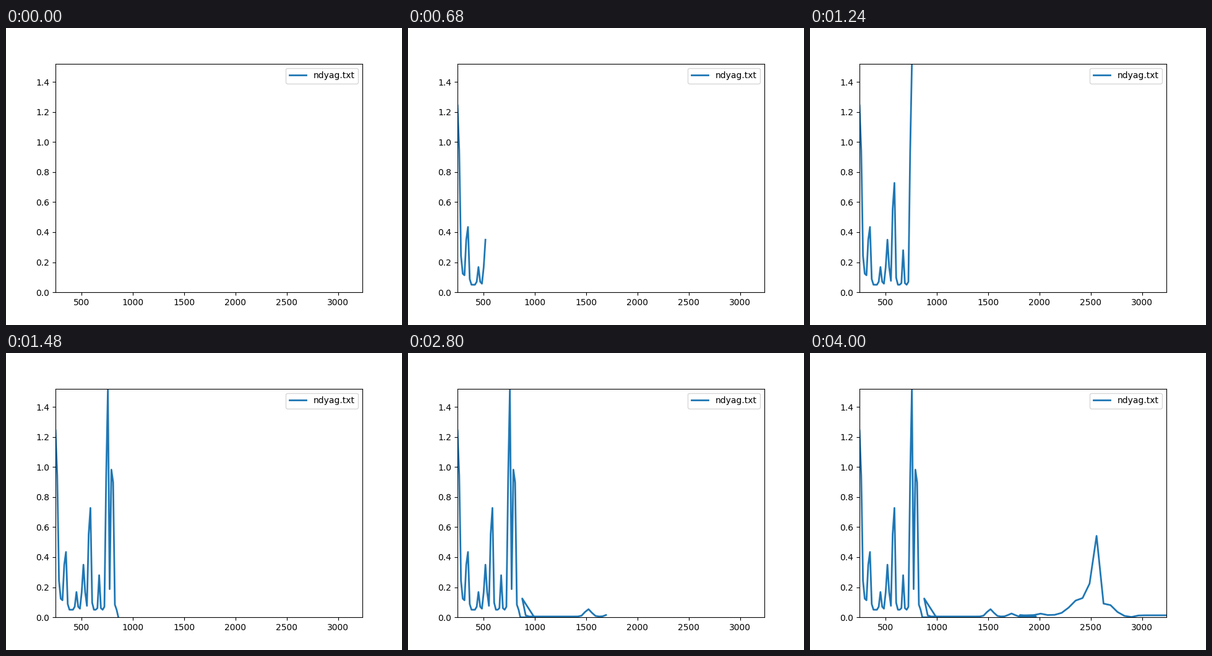
A matplotlib script for the animation above (5.6 s loop, 640 by 480 pixels).

```python
import numpy as np
import matplotlib.pyplot as plt
from matplotlib.animation import FuncAnimation

FRAMES, INTERVAL = 140, 40


def spectrum(count, base, peaks):
    """Sum of Gaussian peaks (centre, height, width), in sample numbers."""
    i = np.arange(count)
    return base + sum(h * np.exp(-((i - c) / w) ** 2) for c, h, w in peaks)


# Three overlapping sweeps, each sampled twice (then four times) as coarsely.
fine = spectrum(45, 0.05, [
    (0.27, 1.25, 1.26), (3.4, 0.08, 0.8), (5.6, 0.473, 0.88),
    (12, 0.118, 0.75), (16, 0.3, 1.03), (19.6, 0.86, 0.82),
    (25, 0.23, 0.57), (29.657, 1.786, 0.78), (32.47, 1.317, 0.8)])
fine[36:] = -0.0005  # detector cut-off
medium = spectrum(33, 0.005, [
    (0, 0.12, 0.6), (18.9, 0.049, 1.3), (25, 0.02, 1.2)])
coarse = spectrum(22, 0.013, [
    (3, 0.011, 0.7), (8.8, 0.115, 2), (10.88, 0.507, 0.756),
    (13.1, 0.067, 0.85), (15.8, -0.012, 0.8)])

x = np.concatenate([248 + 17 * np.arange(45),
                    878 + 34 * np.arange(33),
                    1808 + 68 * np.arange(22)])
y = np.concatenate([fine, medium, coarse])

fig, ax = plt.subplots(figsize=(6.4, 4.8), dpi=100)
line, = ax.plot([], [], lw=2, label="ndyag.txt")
ax.set_xlim(x.min(), x.max())
ax.set_ylim(y.min(), y.max())
ax.legend(loc="upper right")


def init():
    line.set_data([], [])
    return line,


def update(n):
    line.set_data(x[:n], y[:n])
    return line,


anim = FuncAnimation(fig, update, frames=FRAMES, init_func=init,
                     interval=INTERVAL, repeat=True, repeat_delay=0)
plt.show()
```
